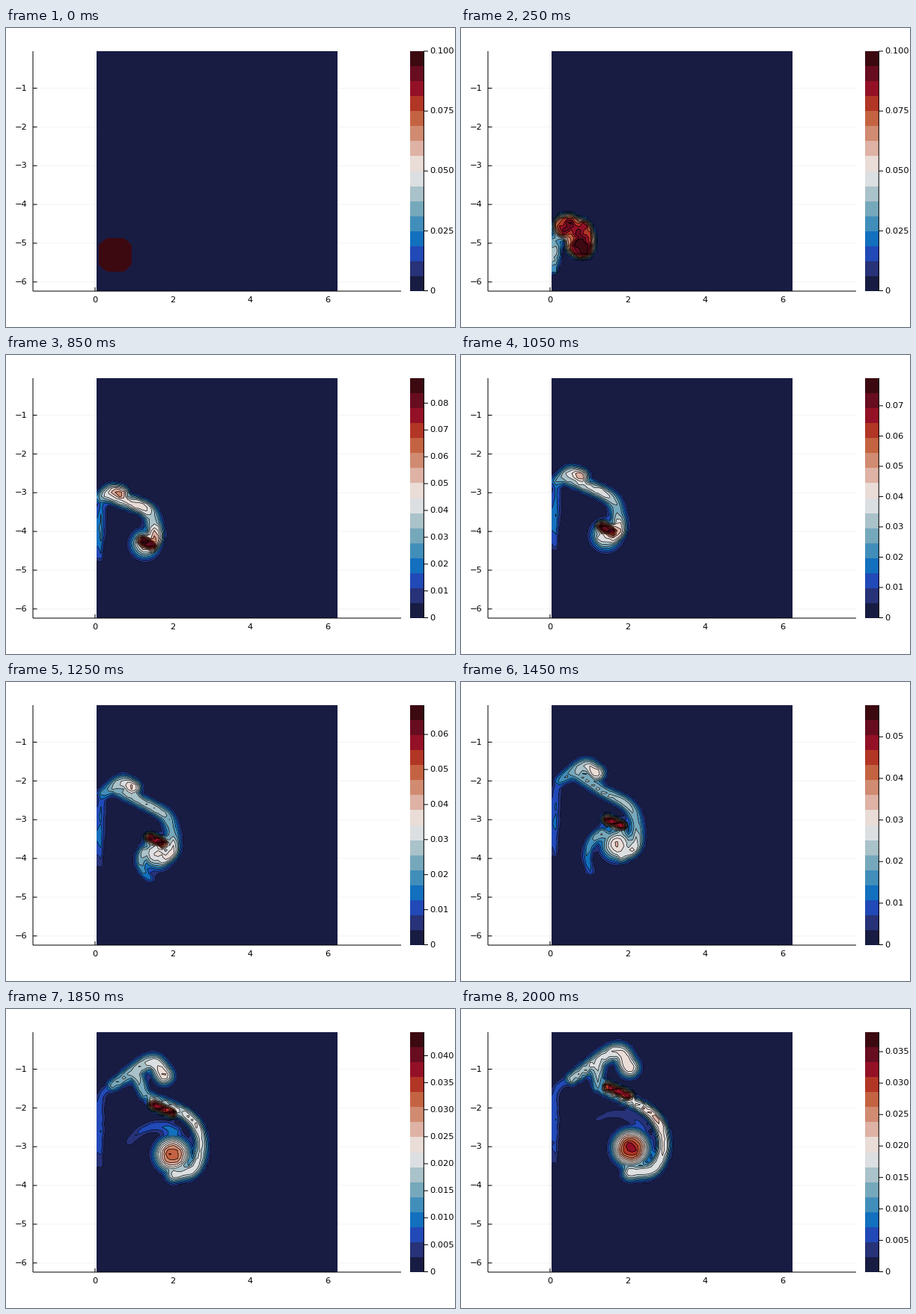
These frames come from a looping animation (600 by 400 pixels, 2050 ms). A matplotlib script:

```python
import numpy as np
import matplotlib.pyplot as plt
from matplotlib.animation import FuncAnimation
from matplotlib.patches import Rectangle

W, H, DPI = 600, 400, 100
FRAMES, INTERVAL = 41, 50
PX = 72 / DPI
LEFT, RIGHT, TOP, BOTTOM = 121.8, 442.6, 31, 352
UNIT = 51.85

BALANCE = ["#181c43", "#273278", "#2149b7", "#1270be", "#418ebb", "#76a8bc",
           "#aac2c9", "#dcdfe1", "#eadcd7", "#deb2a5", "#d08b71", "#c46342",
           "#b23625", "#941026", "#680c20", "#3c0911"]

# Every knot leaves the drop and passes a middle and a last state.
# A state is x, y, radius, strength (1 = top of the scale).
DROP = np.array([146, 303, 22, 1.0])
KNOTS = {
    "left":  [(128, 174, 13, .34), (148, 93, 14, .44)],
    "crest": [(144, 165, 17, .50), (206, 57, 19, .52)],
    "tip":   [(158, 168, 17, .64), (225, 78, 22, .58)],
    "neck":  [(186, 188, 15, .52), (182, 104, 12, .36)],
    "arm1":  [(200, 198, 16, .43), (252, 138, 14, .60)],
    "arm2":  [(206, 214, 17, .38), (271, 178, 14, .54)],
    "arm3":  [(208, 236, 16, .60), (258, 213, 16, .50)],
    "arm4":  [(199, 248, 16, .55), (226, 219, 18, .50)],
    "ball":  [(192, 244, 29, .52), (227, 186, 36, .86)],
    "hot":   [(194, 238, 12, .95), (210, 110, 11, .92)],
}

gx, gy = np.meshgrid(np.linspace(LEFT, RIGHT, 64), np.linspace(TOP, BOTTOM, 64))


def travel(mid, end, s):
    """Parabola in time from the drop through mid (s = 0.5) to end (s = 1)."""
    return ((1 - s) * (1 - 2 * s) * DROP + 4 * s * (1 - s) * np.array(mid)
            + s * (2 * s - 1) * np.array(end))


def smooth(points, per=8):
    """Cubic Hermite curve through the points."""
    p = np.array(points, float)
    m = np.gradient(p, axis=0)
    u = np.linspace(0, 1, per)[:, None, None]
    a, b = p[:-1], p[1:]
    curve = ((2 * u**3 - 3 * u**2 + 1) * a + (u**3 - 2 * u**2 + u) * m[:-1]
             + (3 * u**2 - 2 * u**3) * b + (u**3 - u**2) * m[1:])
    return curve.reshape(-1, 4)


def stroke(points, sharp):
    """Strongest disc along a spine, at every grid node."""
    x, y, r, v = smooth(points).T
    u = np.hypot(gx[..., None] - x, gy[..., None] - y) / np.maximum(r, 3)
    return (np.maximum(v, 0) * np.clip(1 - u**sharp, 0, 1) ** 1.6).max(axis=-1)


def wall(left, i):
    """Streak that the plume drags up along the left wall."""
    v = .2 + .25 * (1 - i / 40) ** 2
    top, bottom = left[1] + 16, 350 - 5.3 * i + .04 * i**2
    return [(*left[:2], 9, .8 * v), (127, top, 10, .8 * v),
            (125, (top + bottom) / 2, 10, v), (125, bottom, 7, .7 * v)]


def tail(ball, i):
    """Spiral that unwinds from the ball and turns clockwise."""
    grow = np.clip((i - 14) / 20, 0, 1)
    length = 60 * grow**2 * (3 - 2 * grow)
    q = np.linspace(0, 1, 5)
    angle = np.radians(136 + 7.6 * (i - 29) + 80 * q)
    reach = length * (1 - .5 * q)
    v = (.55 - .4 * (i / 40) ** 3) * (.5 + .5 * q)
    return np.column_stack([ball[0] + reach * np.cos(angle),
                            ball[1] + reach * np.sin(angle), 9 + 5 * q, v])


def field(i):
    if i == 0:
        dx, dy = abs(gx - 146), abs(gy - 303.5)
        return 500 * (22 - np.maximum.reduce([dx, dy, .65 * (dx + dy)]))
    k = {name: travel(*states, i / 40) for name, states in KNOTS.items()}
    streak = np.array([14, 6, 0, 0]) * i / 40
    spines = [
        [k["left"], k["crest"], k["tip"]],
        [.4 * k["left"] + .6 * k["crest"], k["neck"]],
        [k["neck"], k["arm1"], k["arm2"], k["arm3"], k["arm4"]],
        [k["ball"], k["ball"]],
        [k["hot"] - streak, k["hot"] + streak],
        tail(k["ball"], i),
        wall(k["left"], i),
    ]
    sharp = 2 + 9 * np.exp(-i / 4)
    f = np.maximum.reduce([stroke(s, sharp) for s in spines])
    ripple = .03 + .12 * np.exp(-i / 12)
    return f * (1 + ripple * np.sin(gx / 3.1 + 2 * np.sin(gy / 9)) * np.sin(gy / 3.7))


def scale(i):
    """Top of the colour scale, tick step and decimals."""
    if i < 12:
        return .1, .025, 3
    top = np.interp(i, [13, 21, 29, 33, 40], [.0995, .0791, .0576, .0527, .0381])
    return (top, .01, 2) if top > .05 else (top, .005, 3)


fig = plt.figure(figsize=(W / DPI, H / DPI), dpi=DPI, facecolor="white")
ax = fig.add_axes([0, 0, 1, 1])
ax.set(xlim=(0, W), ylim=(H, 0))
ax.axis("off")


def line(x0, y0, x1, y1, color="black", z=5):
    return ax.plot([x0, x1], [y0, y1], color=color, lw=PX, zorder=z,
                   solid_capstyle="butt", snap=False)[0]


def label(x, y, s, ha):
    return ax.text(x, y - .8, s, fontsize=8.2, family="DejaVu Sans", ha=ha,
                   va="center_baseline", zorder=6)


def box(x, y, w, h, color):
    ax.add_patch(Rectangle((x, y), w, h, fc=color, lw=0, zorder=1, antialiased=False))


for k in range(1, 7):
    y = 80.5 + UNIT * (k - 1)
    line(36, y, 528, y, "#f3f3f3", 0)
    line(36, y, 41.5, y)
    label(28.2, y, f"\u2212{k}", "right")
for k in range(0, 7, 2):
    x = 119 + UNIT * k
    line(x, TOP, x, BOTTOM, "#f3f3f3", 0)
    line(x, 347, x, 352, z=.5)
    label(x, 363.5, str(k), "center")
line(36, TOP, 36, 352)
line(36, 352, 528, 352)

box(LEFT, TOP, RIGHT - LEFT, BOTTOM - TOP, BALANCE[0])
band = (BOTTOM - TOP) / 16
for k, c in enumerate(BALANCE):
    box(540, BOTTOM - (k + 1) * band, 18.5, band, c)
line(558.3, TOP, 558.3, BOTTOM)

LEVELS = np.arange(1, 16) / 16
shown = []


def draw(i):
    while shown:
        shown.pop().remove()
    f = field(i)
    shown.append(ax.contourf(gx, gy, f, levels=[-1e6, *LEVELS, 1e6], colors=BALANCE, zorder=2))
    if i > 0:
        shown.append(ax.contour(gx, gy, f, levels=LEVELS, colors="black",
                                linewidths=.65 * PX, zorder=3))
    top, step, digits = scale(i)
    for k in range(int(top / step + 1e-6) + 1):
        y = 351.5 - 320.5 * k * step / top
        shown.append(line(558, y, 564, y))
        shown.append(label(566.3, y, f"{k * step:.{digits}f}" if k else "0", "left"))
    return shown


anim = FuncAnimation(fig, draw, frames=FRAMES, interval=INTERVAL, init_func=lambda: [],
                     repeat=True, repeat_delay=0, blit=False)
plt.show()
```
